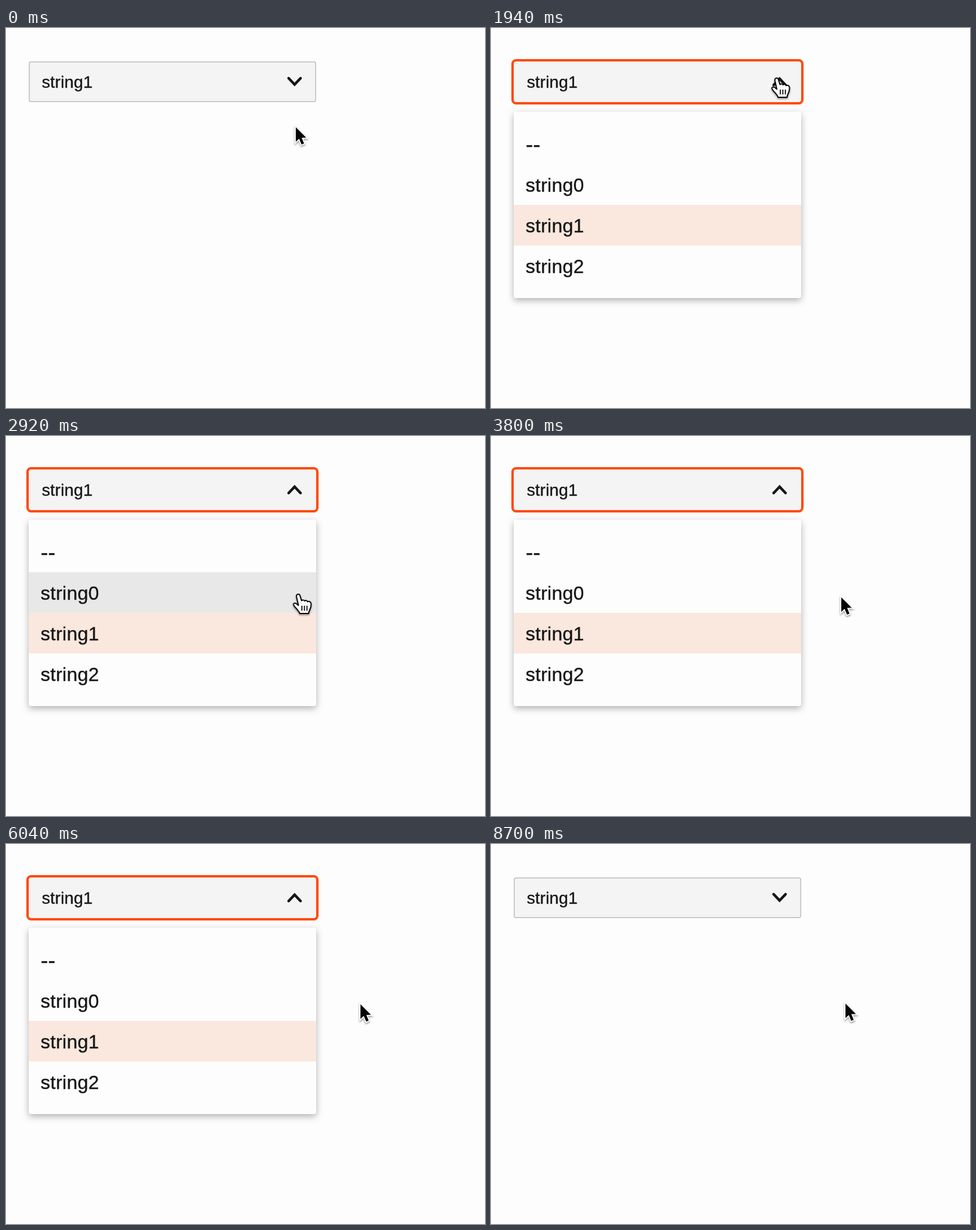
Write an HTML page that moves like this. It is 800x636 px and loops after 8720 ms.

```html
<!DOCTYPE html>
<html lang="en">
<head>
<meta charset="utf-8">
<title>Select menu</title>
<style>
  html, body { margin: 0; width: 100%; height: 100%; overflow: hidden; background: #fdfdfd; }
  svg { display: block; width: 100vw; height: 100vh; }
  text { font-family: "Liberation Sans", Arial, sans-serif; fill: #161616; stroke: #161616; stroke-width: .35px; }
  .value { font-size: 28px; letter-spacing: .15px; }
  .option { font-size: 32px; letter-spacing: .25px; }
  .blank { font-size: 37px; }
  .panel { filter: drop-shadow(0 4px 6px rgba(0, 0, 0, .3)); }
  #arrow { filter: drop-shadow(0 2px 1.5px rgba(0, 0, 0, .4)); }
  #hand { filter: drop-shadow(0 2px 1.5px rgba(0, 0, 0, .4)); }
</style>
</head>
<body>
<svg viewBox="0 0 800 636" xmlns="http://www.w3.org/2000/svg">
  <rect width="800" height="636" fill="#fdfdfd"/>
  <rect id="field" fill="#f4f4f4"/>
  <text class="value" x="59.7" y="100">string1</text>
  <path id="chevron" fill="none" stroke="#161616" stroke-width="4.4" stroke-linecap="round"/>
  <g id="menu">
    <rect class="panel" x="38" y="140" width="480" height="312" rx="4" fill="#fdfdfd"/>
    <rect x="38" y="296" width="480" height="68" fill="#fae7dd"/>
    <rect id="hover" x="38" width="480" height="68" fill="#e8e8e8"/>
    <text class="blank" x="58" y="207">--</text>
    <text class="option" x="57.8" y="274">string0</text>
    <text class="option" x="57.8" y="342">string1</text>
    <text class="option" x="57.8" y="410">string2</text>
  </g>
  <g id="arrow">
    <path d="M0 0V24.5L5.5 19.3L9.6 29L13.8 27.2L9.8 17.8L17.5 17.5Z"
      fill="#050505" stroke="#fff" stroke-width="3.6" paint-order="stroke"/>
  </g>
  <g id="hand">
    <g transform="scale(1.05)">
      <path d="M6.5 2.2C8 .6 10.6 1 11.2 3L14 11.5C15.5 10 18 10.4 18.8 12C20.3 10.6 23 11.2 23.6 13.2
        C25.5 12 28.6 13 29 16C29.5 20 28.5 23 27 26C26 28 25.5 29 25.2 32H11C10.5 29 8 27 6 24.5
        C4 22 1.5 20 1 17.5C.8 15.5 3.5 14.8 5.5 16.2L9 19L6 6C5.6 4.5 5.6 3 6.5 2.2Z"
        fill="#fff" stroke="#0a0a0a" stroke-width="1.9" stroke-linejoin="round"/>
      <path d="M14.5 19.5v8M18.5 19.5v8M22.5 19.5v8" stroke="#0a0a0a" stroke-width="1.7"/>
    </g>
  </g>
</svg>
<script>
const LOOP = 8720, OPEN = 1240, CLOSE = 6540;
const ROW_TOP = 160, ROW_HEIGHT = 68, SELECTED = 2;

// Pointer stops: time, x, y
const stops = [
  [0, 484, 166], [860, 476, 83.5], [2060, 476, 83.5], [2880, 487, 264.5], [2920, 487, 264.5],
  [3800, 585, 270], [3920, 589, 270], [4300, 595, 269], [4780, 592, 269],
  [5740, 592, 269], [6540, 592, 267], [LOOP, 592, 267]
];

const get = id => document.getElementById(id);
const field = get('field'), chevron = get('chevron'), menu = get('menu');
const hover = get('hover'), arrow = get('arrow'), hand = get('hand');
const show = (el, on) => el.setAttribute('display', on ? 'inline' : 'none');
const move = (el, x, y) => el.setAttribute('transform', `translate(${x} ${y})`);
const ease = u => u * u * (3 - 2 * u);

function setAttrs(el, attrs) {
  for (const name in attrs) el.setAttribute(name, attrs[name]);
}

function pointerAt(t) {
  const i = stops.findIndex(s => s[0] > t);
  const [t0, x0, y0] = stops[i - 1], [t1, x1, y1] = stops[i];
  const u = ease((t - t0) / (t1 - t0));
  return { x: x0 + (x1 - x0) * u, y: y0 + (y1 - y0) * u };
}

const closedField = { x: 38.75, y: 56.75, width: 478.5, height: 66.5, rx: 3, stroke: '#bebebe', 'stroke-width': 1.5 };
const openField = { x: 36, y: 54, width: 484, height: 72, rx: 6, stroke: '#ff4a0c', 'stroke-width': 4 };

function draw(t) {
  const { x, y } = pointerAt(t);
  const open = t >= OPEN && t < CLOSE;
  const inside = x >= 38 && x <= 518;
  const row = Math.floor((y - ROW_TOP) / ROW_HEIGHT);
  const onRow = open && inside && row >= 0 && row < 4;
  const onField = inside && y >= 56 && y <= 124;

  setAttrs(field, open ? openField : closedField);
  chevron.setAttribute('d', open ? 'M472 95.5L482 85L492 95.5' : 'M472 84L482 94.5L492 84');
  show(menu, open);
  show(hover, onRow && row !== SELECTED);
  hover.setAttribute('y', ROW_TOP + row * ROW_HEIGHT);

  show(hand, onRow || onField);
  show(arrow, !(onRow || onField));
  move(hand, x - 8, y - 1);
  move(arrow, x, y);
}

function tick() {
  draw(performance.now() % LOOP);
  requestAnimationFrame(tick);
}
tick();
</script>
</body>
</html>
```
